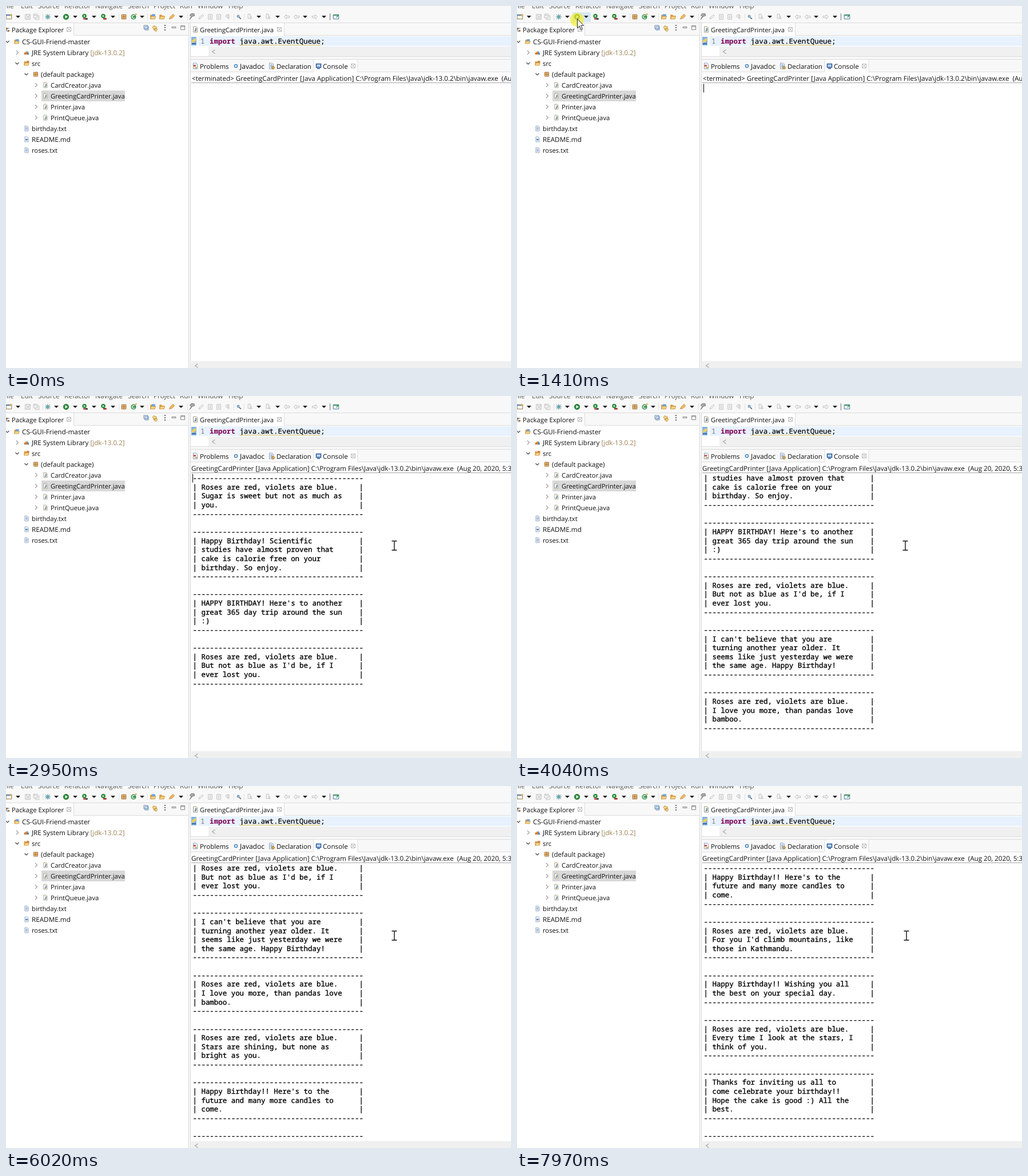
An HTML page for the animation above (8000 ms loop, 883x634 px).

```html
<!DOCTYPE html>
<html lang="en">
<head>
<meta charset="utf-8">
<title>Greeting card printer</title>
<style>
  html, body { margin: 0; width: 100%; height: 100%; overflow: hidden; background: #fff; }
  svg { display: block; width: 883px; height: 634px; }
  text { font-family: "Open Sans", "Noto Sans", sans-serif; font-size: 11.4px; white-space: pre; text-rendering: geometricPrecision; fill: #111; }
  .mono text { font-family: "Noto Sans Mono", monospace; font-size: 12.44px; fill: #000; }
  #console text { stroke: #000; stroke-width: .35px; }
  #menu text { fill: #555; }
  .line { fill: none; stroke: #dcdcdc; }
  .gray { fill: none; stroke: #bcbcbc; }
</style>
</head>
<body>
<svg viewBox="0 0 883 634">
  <defs>
    <path id="drop" d="M-4-2h8l-4 4z" fill="#1c1c1c"/>
    <path id="sep" d="M.5-5v11" stroke="#b0b0b0" stroke-dasharray="1 2"/>
    <path id="close" d="M-3-3l6 6m0-6l-6 6M-3.5-3.5h7v7h-7z" fill="none" stroke="#999" stroke-width=".7"/>
    <path id="open" d="M-3-1.5L0 1.5l3-3" fill="none" stroke="#444" stroke-width="1.2"/>
    <path id="closed" d="M-1.5-3.5L2 0l-3.5 3.5" fill="none" stroke="#999" stroke-width="1.1"/>
    <path id="left" d="M2.5-3.5l-5 3.5 5 3.5" fill="none" stroke="#a8a8a8" stroke-width="1.2"/>
    <path id="page" d="M-3.5-5h5l2 2v8h-7z" fill="#f4f8fd" stroke="#8ba0bd"/>
    <g id="java"><path d="M-3.5-5h5l2 2v8h-7z" fill="#fdfaf0" stroke="#a39a82"/><path d="M1-2.5v4q0 1.500-2.500 1" fill="none" stroke="#2c5f9e" stroke-width="1.500"/></g>
    <g id="txt"><use href="#page"/><path d="M-2-2h4M-2 0h4M-2 2h4" stroke="#6f8fbd"/></g>
    <g id="md"><use href="#page"/><path d="M-2-1l1 3 1-3 1 3 1-3" fill="none" stroke="#3767a5"/></g>
    <g id="folder"><path d="M-5 4v-8h4l1 2h4v6z" fill="#d99a3c"/><path d="M-5 4l2-5h8l-2 5z" fill="#fbd583" stroke="#b97a2c" stroke-width=".7"/></g>
    <g id="project"><use href="#folder"/><path d="M-2-5h6v4h-6z" fill="#6ba2df"/></g>
    <g id="jre"><path d="M-5 4v-4h3v-2h3v6z" fill="#d47a2b"/><path d="M1 4l1-8 3 8z" fill="#4178b8"/></g>
    <g id="source"><use href="#folder"/><path d="M0-5h5v4H0z" fill="#c9864a"/></g>
    <g id="pkg"><path d="M-4-4h8v8h-8z" fill="#f1c27d" stroke="#9a642b"/><path d="M0-4v8M-4 0h8" stroke="#9a642b"/></g>
    <g id="green"><circle r="5" fill="#2c8b3c" stroke="#17682a" stroke-width=".8"/><path d="M-1.5-2.8L3 0l-4.5 2.8z" fill="#fff"/></g>
    <g id="tool"><circle cx="-1" cy="-1.5" r="4" fill="#2c8b3c"/><path d="M-2.2-3.5l3 2-3 2z" fill="#fff"/></g>
    <g id="greenTool"><use href="#tool"/><path d="M-1 2h6v3h-6z" fill="#a3372c"/></g>
    <g id="greenBar"><use href="#tool"/><path d="M-3 2.5h4V5h-4z" fill="#c22f2f"/><path d="M1 2.5h4V5H1z" fill="#222"/></g>
    <g id="bug"><path d="M-4-4l8 8m0-8l-8 8M-5 0h10M0-5V5" stroke="#396e89"/><circle r="2.8" fill="#62a8ab"/></g>
    <g id="newFile"><path d="M-5-4H5v8H-5z" fill="#fffdf2" stroke="#89733f"/><path d="M-5-3H3" stroke="#4f83c2" stroke-width="2"/><path d="M4-6v5M1.5-3.5h5" stroke="#e0aa2f"/></g>
    <g id="class"><circle r="4.8" fill="#35924c"/><path d="M2-1.8A2.6 2.6 0 1 0 2 1.8" fill="none" stroke="#fff" stroke-width="1.3"/><path d="M3-5h3" stroke="#d9a130" stroke-width="2"/></g>
    <path id="pencil" d="M-5 4l2-4 5-5 3 3-5 5z" fill="#f3b75e" stroke="#b7772f" stroke-width=".7"/>
    <path id="disk" class="gray" d="M-4.5-4.5h9v9h-9zM-2-4v3h5v-3M-2 4V1h4v3"/>
    <path id="disks" class="gray" d="M-5-5h7v7h-7zM-2 2v3h7v-7H2M-3-5v3h4"/>
    <path id="grayPencil" class="gray" d="M-4 4l1-3 6-5 1 2-5 5z"/>
    <path id="grayPage" class="gray" d="M-3.5-4.5h7v9h-7zM-1.5-2h3M-1.5 0h3M-1.5 2h3"/>
    <path id="mark" class="gray" d="M1 4v-8h2v8M1-4q-4 0-4 2.5T1 1"/>
    <path id="step" class="gray" d="M-4-5h4V3h-4zM2-2v6m-2-2l2 2 2-2"/>
    <path id="back" class="gray" d="M-5 0l4-4v2.5h6v3h-6V4z"/>
    <path id="pin" d="M-4 5l3-6-3-2 3-3h5l1 4-4 1z" fill="#a8a8a8" stroke="#777"/>
    <g id="lens"><circle cx="-1" cy="-1" r="2" fill="#b8d4ea" stroke="#3e6a91"/><path d="M1 1l3 3" stroke="#2d5476" stroke-width="1.5"/></g>
    <g id="window"><path d="M-5-4H5v8H-5z" fill="#eef6fc" stroke="#467993"/><path d="M-5-3H5" stroke="#4c9a63" stroke-width="2"/><path d="M1 1l4-5" stroke="#3a9356" stroke-width="1.5"/></g>
    <clipPath id="view"><path d="M324 136h559v485H324z"/></clipPath>
  </defs>

  <path d="M0 0h883v634H0z" fill="#f8f8f8"/>
  <path d="M0 52h318v582H0zM0 30h118v24H0zM324 30h162v24H324zM324 52h559v36H324zM324 116h559v506H324zM538 94h77v24h-77z" fill="#fff"/>
  <path class="line" d="M0 29.5h883M118.5 30v21.5h200M486.5 30v21.5H883M319.5 30v604M322.5 30v604M323 88.5h560M323 93.5h560M323 115.5h215v-22h77v22h268"/>
  <path d="M337 53h546v17H337z" fill="#e8f2fe"/>
  <path d="M354 71h529v17H354zM324 622h559v12H324z" fill="#f0f0f0"/>
  <path d="M324 134.5h559" stroke="#a5a5a5"/>
  <use href="#left" x="363" y="80"/><use href="#left" x="333" y="630"/>

  <g id="menu"></g>
  <rect id="hot" y="11" height="17" fill="#d5e8f8"/>
  <g id="toolbar"></g>
  <path d="M566.5 13v12" stroke="#777"/>

  <g transform="translate(1 41)"><path d="M-1-3h3v3h-3zM2 1h3v3H2z" fill="#ad7740"/><path d="M0 0v3h3M2-2h3" fill="none" stroke="#4d79ae"/></g>
  <text x="10" y="46">Package Explorer</text>
  <path d="M241 34h7v6h-7zM243 36h6v6h-6zM245 39h3" fill="#f3f8ff" stroke="#668bb5"/>
  <path d="M256 37l3-3v2h4v4h-4v2zM265 41l-3-3v2h-3v3h3v2z" fill="#f8d98b" stroke="#b98a34" stroke-width=".8"/>
  <path d="M278 33v2m0 2v2m0 2v2" stroke="#666" stroke-width="2"/>
  <path d="M290 36.5h7v2h-7zM305.5 34.5h7v7h-7zM305 36h8" fill="none" stroke="#888"/>
  <rect x="62" y="148" width="146" height="19" fill="#d9d9d9"/>
  <g id="tree"></g>

  <use href="#java" x="331" y="41"/>
  <text x="339" y="46" style="font-size:11.2px">GreetingCardPrinter.java</text>
  <use href="#close" x="110" y="41"/><use href="#close" x="478" y="41"/><use href="#close" x="607" y="105"/>
  <path d="M324 54h9v15h-9z" fill="#81b4e4"/><path d="M325 60l7-4v5l-7 4z" fill="#f4d15b"/><path d="M325 66h7" stroke="#3e6ea8" stroke-width="2"/>
  <g class="mono">
    <text x="340" y="65.5" style="fill:#787878">1</text>
    <text x="356" y="65.5" stroke="#000" stroke-width=".2"><tspan fill="#7f0055" stroke="none" font-weight="bold">import</tspan> java.awt.EventQueue;</text>
  </g>
  <path d="M408 68.5h142" stroke="#e6c55a"/>

  <use href="#page" x="331" y="105"/><path d="M328 103h4v3h-4z" fill="#cc5a48"/><path d="M330 107h4v2h-4z" fill="#e4ad38"/>
  <text x="339" y="110">Problems</text>
  <circle cx="402" cy="105" r="2.6" fill="none" stroke="#4885be" stroke-width="1.5"/>
  <text x="409" y="110" style="font-size:12px">Javadoc</text>
  <use href="#txt" x="464" y="105"/><circle cx="467" cy="108" r="2.3" fill="#e6b551" stroke="#916b2c"/>
  <text x="473" y="110">Declaration</text>
  <path d="M542.5 101.5h8v6h-8zM544 109.5h5" fill="#b9d7f5" stroke="#2b5796" stroke-width="1.5"/>
  <text x="554" y="110" style="font-size:11.7px">Console</text>
  <text id="header" y="131" style="font-size:11.63px"></text>

  <g clip-path="url(#view)"><g id="console" class="mono"></g></g>
  <path id="caret" d="M326.5 136.5v15" stroke="#000"/>
  <g id="arrow"><circle r="12" fill="#f3ee2c" opacity=".7"/><path d="M.5-1.5v16l3.7-3.5 2.8 6.5 2.5-1-2.8-6.3h5z" fill="#fff" stroke="#222"/></g>
  <path id="beam" d="M-4.5-8h3.5q1 0 1 1V7q0 1-1 1h-3.5M4.5-8H1q-1 0-1 1V7q0 1 1 1h3.5" fill="none" stroke="#111" stroke-width="1.4"/>
</svg>
<script>
const LOOP = 8000, PITCH = 15.63;
const $ = id => document.getElementById(id);
const icon = (id, x, y, scale = 1) =>
  `<use href="#${id}" transform="translate(${x} ${y}) scale(${scale})"/>`;
const label = (x, y, text, size = 11.4, extra = '') =>
  `<text x="${x}" y="${y}" style="font-size:${size}px">${text}${extra}</text>`;

const menu = { File: -5, Edit: 26, Source: 56, Refactor: 102, Navigate: 156,
  Search: 213, Project: 258, Run: 304, Window: 335, Help: 389 };
$('menu').innerHTML = Object.entries(menu).map(([name, x]) => label(x, 4, name, 11.8)).join('');

const tools = {
  newFile: [5], disk: [38], disks: [53], bug: [73], green: [105], greenBar: [138], greenTool: [171],
  pkg: [206], class: [223], project: [257], folder: [273], pencil: [290], pin: [325],
  grayPencil: [341], grayPage: [357, 372], mark: [387], lens: [407], step: [427, 459],
  back: [491, 508], window: [577], sep: [64, 197, 247, 317, 398, 416],
  drop: [21, 88, 121, 154, 187, 238, 306, 442, 475, 523, 556]
};
$('toolbar').innerHTML = Object.entries(tools)
  .flatMap(([id, xs]) => xs.map(x => icon(id, x, 19, id === 'drop' ? 1 : .95))).join('') +
  icon('back', 540, 19, '-.95 .95');

// icon, icon x, label, font size, expander, extra label
const tree = [
  ['project', 19, 'CS-GUI-Friend-master', 11.75, 'open'],
  ['jre', 36, 'JRE System Library', 11.6, 'closed', '<tspan fill="#9b8052"> [jdk-13.0.2]</tspan>'],
  ['source', 36, 'src', 11.4, 'open'],
  ['pkg', 52, '(default package)', 11.6, 'open'],
  ['java', 69, 'CardCreator.java', 11.3, 'closed'],
  ['java', 69, 'GreetingCardPrinter.java', 11.25, 'closed'],
  ['java', 69, 'Printer.java', 11.25, 'closed'],
  ['java', 69, 'PrintQueue.java', 11.25, 'closed'],
  ['txt', 36, 'birthday.txt', 11.3],
  ['md', 36, 'README.md', 11.7],
  ['txt', 36, 'roses.txt', 11.25]
];
$('tree').innerHTML = tree.map(([id, x, name, size, expander, extra], i) => {
  const y = 63 + i * 19;
  return (expander ? icon(expander, x - 16.5, y - .5) : '') + icon(id, x, y - .5, .88) +
    label(x + 9, y + 4, name, size, extra);
}).join('');

const RED = 'Roses are red, violets are blue./';
const cards = [
  RED + 'Sugar is sweet but not as much as/you.',
  'Happy Birthday! Scientific/studies have almost proven that/cake is calorie free on your/birthday. So enjoy.',
  "HAPPY BIRTHDAY! Here's to another/great 365 day trip around the sun/:)",
  RED + "But not as blue as I'd be, if I/ever lost you.",
  "I can't believe that you are/turning another year older. It/seems like just yesterday we were/the same age. Happy Birthday!",
  RED + 'I love you more, than pandas love/bamboo.',
  RED + 'Stars are shining, but none as/bright as you.',
  "Happy Birthday!! Here's to the/future and many more candles to/come.",
  RED + "For you I'd climb mountains, like/those in Kathmandu.",
  'Happy Birthday!! Wishing you all/the best on your special day.',
  RED + 'Every time I look at the stars, I/think of you.',
  'Thanks for inviting us all to/come celebrate your birthday!!/Hope the cake is good :) All the/best.'
];
const dashes = '-'.repeat(40);
const lines = cards.flatMap(card =>
  [dashes, ...card.split('/').map(s => `| ${s.padEnd(37)}|`), dashes, '']).concat(dashes);
$('console').innerHTML = lines.map((s, i) =>
  `<text x="326.5" y="${148.2 + i * PITCH}">${s}</text>`).join('');
const rows = [...$('console').children];

// Step tracks: [start time, value...]
const printed = [[0, 0], [1970, 13], [2950, 25], [3940, 38], [4940, 50], [6020, 61], [6990, 74], [7970, 75]];
const scroll = [[0, 0], [4040, 8], [5030, 20], [6130, 31], [6990, 44]];
const caret = [[0, 0], [1310, 1], [1750, 0], [2090, 1], [2530, 0], [2950, 1], [3500, 0], [3940, 1], [4040, 0]];
const pointer = [
  [0, -99, -99], [100, 74, 178], [220, 125, 28], [430, 150, 14], [540, 178, 12], [650, 160, 20],
  [760, 130, 26], [870, 100, 29], [970, 84, 30], [1080, 95, 27], [1190, 104, 25], [1310, 105, 24],
  [1750, 180, 70], [1860, 400, 150], [1970, 590, 220], [2090, 679, 262],
  [6680, 675, 263], [7220, 678, 262], [7440, 681, 262]
];
const buttons = [[66, 95], [97, 129], [130, 161], [162, 195]];
const at = (track, t) => track.findLast(step => step[0] <= t).slice(1);
const show = (id, on) => $(id).setAttribute('visibility', on ? 'visible' : 'hidden');
const place = (id, x, y) => $(id).setAttribute('transform', `translate(${x} ${y})`);

const launch = 'GreetingCardPrinter [Java Application] C:\\Program Files\\Java\\jdk-13.0.2\\bin\\javaw.exe  (Aug 20, 2020, 5:3';

function draw(t) {
  const [x, y] = at(pointer, t);
  const typing = x > 323 && y > 135;
  place('arrow', x, y);
  place('beam', x, y);
  show('arrow', !typing);
  show('beam', typing);

  const hot = y > 10 && y < 28 && buttons.find(([a, b]) => x >= a && x <= b);
  show('hot', hot);
  if (hot) {
    $('hot').setAttribute('x', hot[0]);
    $('hot').setAttribute('width', hot[1] - hot[0]);
  }

  const running = t >= 1750;
  $('header').setAttribute('x', running ? 324 : 325);
  $('header').textContent = running ? launch : '<terminated> ' + launch;

  const [count] = at(printed, t);
  rows.forEach((row, i) => row.setAttribute('visibility', i < count ? 'visible' : 'hidden'));
  place('console', 0, -at(scroll, t)[0] * PITCH);
  show('caret', at(caret, t)[0]);
}

function tick() {
  draw(performance.now() % LOOP);
  requestAnimationFrame(tick);
}
tick();
</script>
</body>
</html>
```
